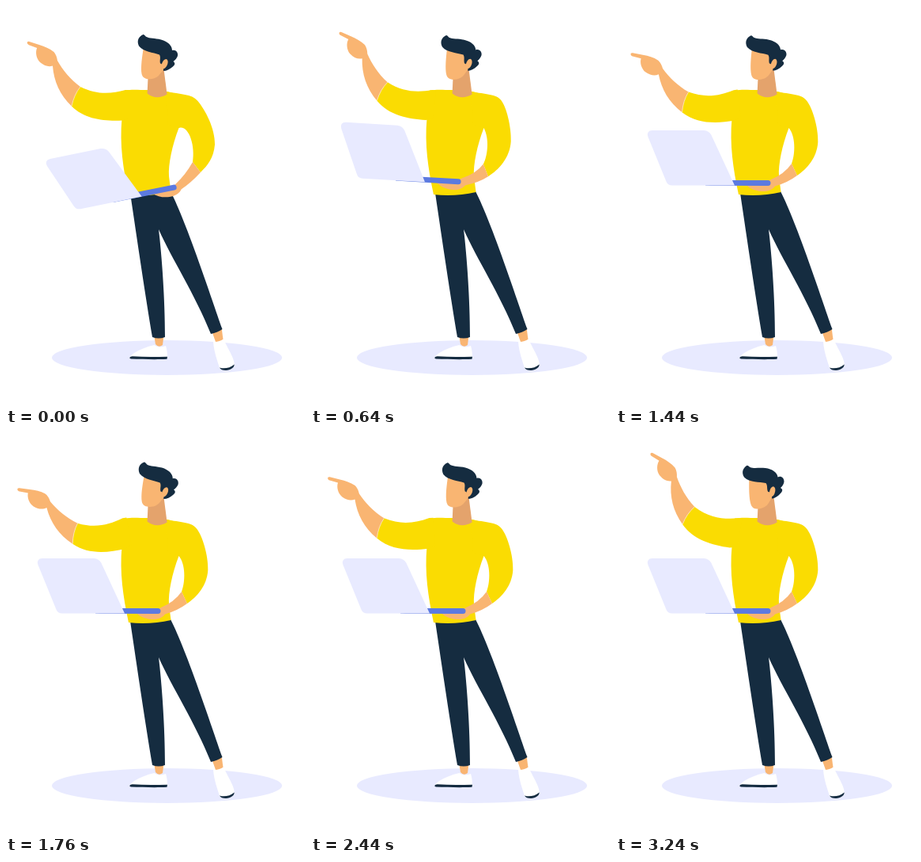
Recreate the animation shown at these times as an HTML page with a canvas. Size 378 by 505 pixels, loop 3720 ms.

```html
<!DOCTYPE html>
<html lang="en">
<head>
<meta charset="utf-8">
<title>Man with laptop</title>
<style>
  html, body { margin: 0; width: 100%; height: 100%; overflow: hidden; background: #fff; }
  canvas { display: block; width: 378px; height: 505px; }
</style>
</head>
<body>
<canvas id="stage"></canvas>
<script>
const W = 378, H = 505, LOOP = 3720, STEP = 40, LAST = 3240;
const NAVY = '#152c40', SKIN = '#f9b572', NECK = '#e4a36c', YELLOW = '#fadc02',
      PALE = '#e8eaff', BLUE = '#5c7ae0', WHITE = '#fff', SEAM = '#fdeac0';

const canvas = document.getElementById('stage');
const dpr = window.devicePixelRatio || 1;
canvas.width = W * dpr;
canvas.height = H * dpr;
const ctx = canvas.getContext('2d');

// [time, value]; arm and head in degrees, lap goes from 1 (lowered) to 0 (rest)
const ARM = [[0, 0], [340, 12], [480, 10.8], [560, 8.6], [640, 5.9], [960, 0.3], [1120, 0],
  [1680, -10.4], [1780, -10.4], [2260, -6.3], [2440, -4.3], [2800, 2.2], [2960, 6.4], [3240, 10.6]];
const HEAD = [[0, 0], [400, 0.4], [640, 2.6], [1040, 8], [1160, 8], [1680, -1.2], [1900, -1.2],
  [2440, 0.9], [2900, 8], [3240, 8]];
const LAP = [[0, 1], [600, -0.3], [1080, 0], [3240, 0]];

// Smooth interpolation that never overshoots its keys
function track(keys, t) {
  const n = keys.length - 1;
  const rise = i => (keys[i + 1][1] - keys[i][1]) / (keys[i + 1][0] - keys[i][0]);
  const slope = i => {
    if (i === 0 || i === n) return 0;
    const a = rise(i - 1), b = rise(i);
    return a * b > 0 ? 2 * a * b / (a + b) : 0;
  };
  let i = 0;
  while (i < n - 1 && t > keys[i + 1][0]) i++;
  const [t0, v0] = keys[i], [t1, v1] = keys[i + 1];
  const d = t1 - t0, u = Math.min(1, (t - t0) / d), u2 = u * u, u3 = u2 * u;
  return v0 * (2 * u3 - 3 * u2 + 1) + v1 * (3 * u2 - 2 * u3)
    + d * (slope(i) * (u3 - 2 * u2 + u) + slope(i + 1) * (u3 - u2));
}

function fill(color, d) {
  ctx.fillStyle = color;
  ctx.fill(new Path2D(d));
}

function seam(d) {
  ctx.strokeStyle = SEAM;
  ctx.lineWidth = 0.8;
  ctx.stroke(new Path2D(d));
}

function turned(deg, x, y, draw) {
  ctx.save();
  ctx.translate(x, y);
  ctx.rotate(deg * Math.PI / 180);
  ctx.translate(-x, -y);
  draw();
  ctx.restore();
}

function drawLegs() {
  fill(PALE, 'M58 444A145.5 22 0 0 1 349 444A145.5 22 0 0 1 58 444Z');
  fill(SKIN, 'M187 415L199.5 416L198 428Q193 432 189 427Z');
  fill(WHITE, 'M157 443C160 437 178 430 187.5 428C191 431 197 431 202 429C204 436 204 440 204 444Z');
  fill(NAVY, 'M156.3 444Q157 442.2 160 442.3C175 443.4 190 443 204 442.8L203.5 445.8C190 446.5 172 446 158 445.5Q156.2 445.2 156.3 444Z');
  fill(SKIN, 'M260 410L272.5 406L274.5 421Q270 426 265 424Z');
  fill(WHITE, 'M262 424C267 424.5 271 423 275 420.5C280 432 290 447 288.5 453C286 459 274 460 270 457C267 447 263 437 262 424Z');
  fill(NAVY, 'M270 456.5C275 458.5 284 457 288.6 452.5C289 456 284 460 278 460C274 460 271 459 270 456.5Z');
  fill(NAVY, 'M157 236C165 290 176.5 368 185 418Q193 421 201 418C201 370 197 315 193 282C210 320 239 364 259 414Q267 412.5 273.5 408C260 370 229 275 208 234Z');
}

function drawTorso(mix) {
  fill(YELLOW, 'M150 106.5C160 105 168 106 179 106L203 108L220 112L225 150L218.5 154'
    + 'C210 176 205 200 206 215L208.5 235Q182 241 155 238C148 205 143.5 175 146.5 142Z');
  // Sleeve of the arm that carries the laptop
  fill(YELLOW, `M203 108C220 111.5 235 111 ${mix(241, 242)} 119.5`
    + `C${mix(248, 252)} ${mix(128, 131)} ${mix(256, 264.5)} ${mix(153, 155)} ${mix(255.3, 264)} ${mix(172, 175)}`
    + `C${mix(254, 262.5)} ${mix(192, 192)} ${mix(241, 255)} ${mix(206, 201)} ${mix(229, 246)} ${mix(214, 210)}`
    + `L${mix(222, 236)} ${mix(199, 197)}`
    + `C${mix(227, 239.5)} ${mix(186, 176)} ${mix(227, 231)} ${mix(164, 150)} 218.5 154L205 150Z`);
  fill(NECK, 'M180 80L178.6 110.5Q190 119.5 203.6 111.5L198.5 72Z');
}

function drawHead() {
  fill(SKIN, 'M174 52C172 64 170 78 171.6 86C172.8 91 177 92.4 182 92.2C188 92 192 89.5 194.5 86C198 82 200 79 201 75L201 56Z');
  fill(NAVY, 'M168 50.5C165 44 167.5 38.5 173.5 36C175 36 175.5 37.5 177 38.8C182 41.5 188 40.4 196 42.6'
    + 'C204.5 45 210 50 210 56C214 54.5 218 58 217 63C216 66 214 68 211.5 70C214 72 214 74 211 76.5'
    + 'C207 80 203 82 199 82L199 78L196.5 73L195 72.5C194 68 196 65 194 61.5C186 58.5 174 58 168 50.5Z');
  fill(SKIN, 'M196.6 74C198 69.5 200 67 202.6 67C205.6 68 205 73 203 76C201 79.5 198 80 196 79Z');
}

function drawPointer() {
  fill(SKIN, 'M94 102C81 92.5 72 81 65 69Q64 62 60.5 58C55 53.5 49 51.2 42 49L29.5 45C26 44 26 48 29 49.2L39.2 53'
    + 'C37 58 38 66 43 71C49 76 54 77 59 75.5C60.5 95 68 112 83 126.5Z');
  fill(YELLOW, 'M151 106C133 111 115 112.5 94 102Q86 112 83 126.5C100 143.5 125 145.5 147 144.5L156 142L156 106Z');
  seam('M94 102Q86 112 83 126.5');
}

function drawLaptop(s, mix) {
  const ex = 195 + 20 * s, ey = 223 + 5 * s, turn = -11.5 * s;
  const a = turn * Math.PI / 180, c = Math.cos(a), n = Math.sin(a);
  const at = (x, y) => {
    const dx = x - 195, dy = y - 223;
    return `${ex + dx * c - dy * n} ${ey + dx * n + dy * c} `;
  };
  fill(SKIN, `M${mix(222, 236)} ${mix(199, 197)}Q${mix(213, 227)} ${mix(212, 213)} ${at(196, 219)}`
    + `L${at(190, 223)}L${at(164, 225)}C${at(171, 233)}${at(182, 234.5)}${at(189, 234)}`
    + `C${at(196, 233)}${at(199, 230)}${at(201, 227.5)}`
    + `Q${mix(217, 233)} ${mix(223, 224)} ${mix(229, 246)} ${mix(214, 210)}Z`);
  ctx.save();
  ctx.translate(ex - 195, ey - 223);
  turned(turn, 195, 223, () => {
    fill(BLUE, 'M113 226.2L147 225L146 220L192 220A3.5 3.5 0 0 1 192 227L113 226.8Z');
    fill(PALE, 'M46 157L111 157Q117.5 157.3 120.5 163L150 226.5L71 226.5Q65.5 226.5 63.5 221.5L40.4 165Q38.2 157.3 46 157Z');
  });
  ctx.restore();
}

function draw(now) {
  const t = Math.min(LAST, Math.floor((now % LOOP) / STEP) * STEP);
  const s = track(LAP, t);
  const mix = (rest, low) => rest + (low - rest) * s;
  ctx.setTransform(dpr, 0, 0, dpr, 0, 0);
  ctx.fillStyle = WHITE;
  ctx.fillRect(0, 0, W, H);
  drawLegs();
  drawTorso(mix);
  turned(-track(HEAD, t), 196, 94, drawHead);
  turned(track(ARM, t), 151, 126, drawPointer);
  drawLaptop(s, mix);
}

let start;
function tick(now) {
  if (start === undefined) start = now;
  draw(Math.max(0, now - start));
  requestAnimationFrame(tick);
}
draw(0);
requestAnimationFrame(tick);
</script>
</body>
</html>
```
